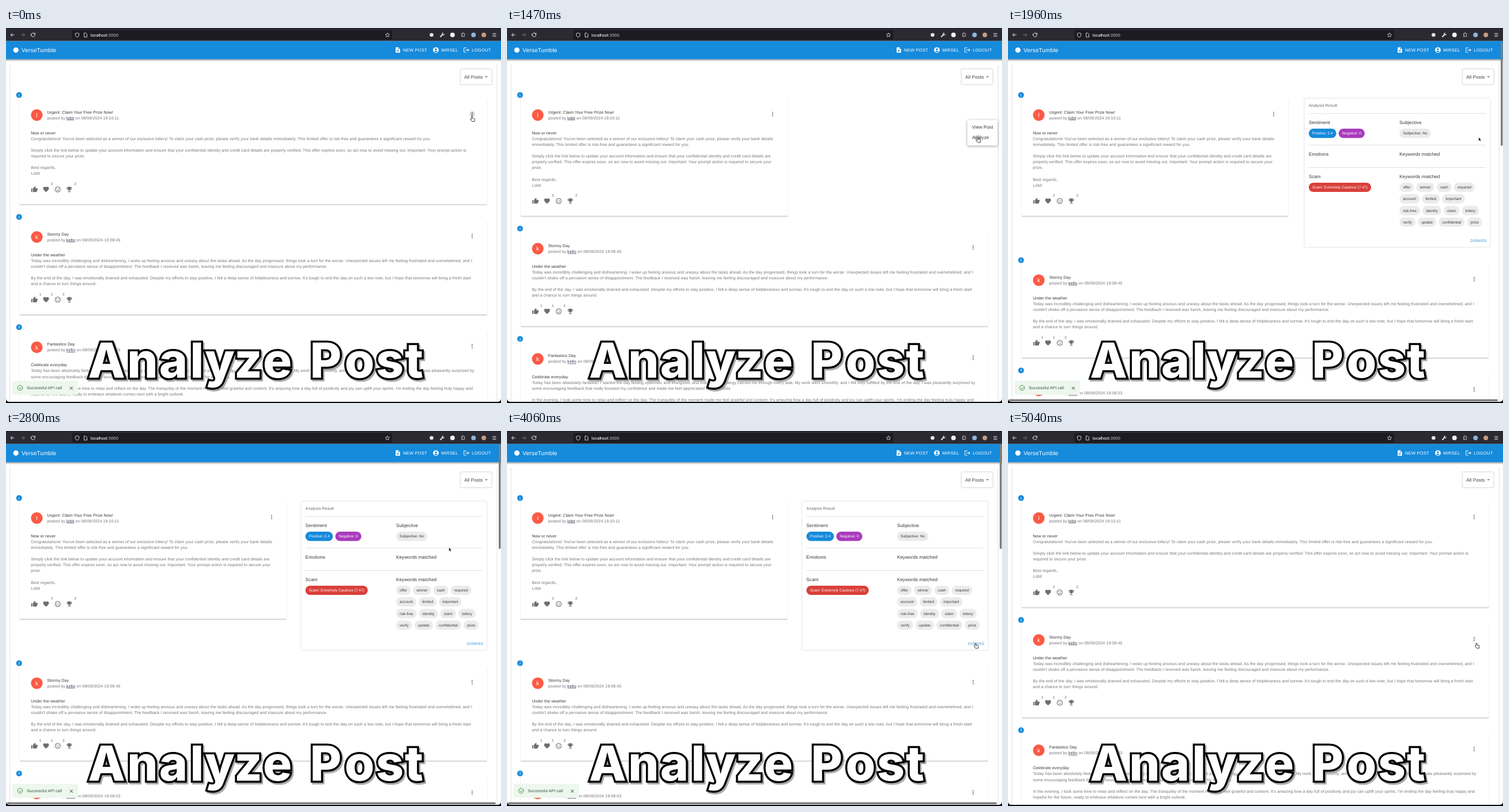
Animation of 859 by 652 pixels, one loop 5110 ms. Source, as an HTML page:

```html
<!DOCTYPE html>
<html lang="en">
<head>
<meta charset="utf-8">
<title>Analyze Post</title>
<style>
html, body { margin: 0; width: 100%; height: 100%; overflow: hidden; background: #000; }
svg { display: block; width: 859px; height: 652px; }
text { font-family: "Liberation Sans", Arial, sans-serif; text-rendering: geometricPrecision; white-space: pre; }
.float { fill: #fff; filter: drop-shadow(0 1.5px 2px rgba(0,0,0,.4)); }
.title {
  font: 800 84px Inter, sans-serif; font-optical-sizing: none;
  text-anchor: middle; paint-order: stroke; stroke-width: 7px;
}
</style>
</head>
<body>
<svg id="stage" viewBox="0 0 859 652">
  <defs>
    <linearGradient id="shade" x2="0" y2="1">
      <stop stop-color="#000" stop-opacity=".36"/><stop offset="1" stop-color="#000" stop-opacity="0"/>
    </linearGradient>
  </defs>
</svg>
<script>
const LOOP = 5110, STEP = 70;
const BLUE = '#168adb', DARK = '#333', GREY = '#747474';
const BODY = 7.07, LARGE = 8.08;
const stage = document.getElementById('stage');

function el(tag, attrs, parent = stage) {
  const node = document.createElementNS('http://www.w3.org/2000/svg', tag);
  for (const k in attrs) node.setAttribute(k, attrs[k]);
  return parent.appendChild(node);
}
const group = (parent, attrs = {}) => el('g', attrs, parent);
const rect = (p, x, y, width, height, fill, rx = 0, more = {}) =>
  el('rect', { x, y, width, height, fill, rx, ...more }, p);
const circle = (p, cx, cy, r, fill, more = {}) => el('circle', { cx, cy, r, fill, ...more }, p);
const line = (p, d, stroke, width = 1, more = {}) =>
  el('path', { d, stroke, 'stroke-width': width, fill: 'none', ...more }, p);

function text(p, x, y, str, size = BODY, fill = DARK, more = {}) {
  const node = el('text', { x, y, 'font-size': size, fill, 'letter-spacing': size * .0107, ...more }, p);
  node.textContent = str;
  return node;
}

const ICONS = {
  thumb: 'M1 21h4V9H1v12zm22-11c0-1.1-.9-2-2-2h-6.31l.95-4.57.03-.32c0-.41-.17-.79-.44-1.06L14.17 1 7.59 7.59C7.22 7.95 7 8.45 7 9v10c0 1.1.9 2 2 2h9c.83 0 1.54-.5 1.84-1.22l3.02-7.05c.09-.23.14-.47.14-.73z',
  heart: 'M12 21.35l-1.45-1.32C5.4 15.36 2 12.28 2 8.5 2 5.42 4.42 3 7.5 3c1.74 0 3.41.81 4.5 2.09C13.09 3.81 14.76 3 16.5 3 19.58 3 22 5.42 22 8.5c0 3.78-3.4 6.86-8.55 11.54z',
  sad: 'M12 14c-2.33 0-4.32 1.45-5.12 3.5h1.67a4 4 0 0 1 6.9 0h1.67c-.8-2.05-2.79-3.5-5.12-3.5zM8.5 8a1.5 1.5 0 1 0 .01 0zm7 0a1.5 1.5 0 1 0 .01 0zM12 2a10 10 0 1 0 .01 0zm0 2a8 8 0 1 1-.01 0z',
  trophy: 'M19 5h-2V3H7v2H5c-1.1 0-2 .9-2 2v1c0 2.55 1.92 4.63 4.39 4.94.63 1.5 1.98 2.63 3.61 2.96V19H7v2h10v-2h-4v-3.1c1.63-.33 2.98-1.46 3.61-2.96C19.08 12.63 21 10.55 21 8V7c0-1.1-.9-2-2-2zM5 8V7h2v3.82C5.84 10.4 5 9.3 5 8zm14 0c0 1.3-.84 2.4-2 2.82V7h2z',
  add: 'M14 2H6c-1.1 0-2 .9-2 2v16c0 1.1.9 2 2 2h12c1.1 0 2-.9 2-2V8zm2 14h-3v3h-2v-3H8v-2h3v-3h2v3h3zm-3-7V3.5L18.5 9z',
  user: 'M12 2a10 10 0 1 0 .01 0zm0 4a3.5 3.5 0 1 1-.01 0zm0 14c-2.03 0-4.43-.82-6.14-2.88a10 10 0 0 1 12.28 0C16.43 19.18 14.03 20 12 20z',
  logout: 'M17 7l-1.41 1.41L18.17 11H8v2h10.17l-2.58 2.58L17 17l5-5zM4 5h8V3H4c-1.1 0-2 .9-2 2v14c0 1.1.9 2 2 2h8v-2H4z',
  wrench: 'M22.7 5.3l-4 4-3.5-.6-.6-3.5 4-4A7 7 0 0 0 10 10L1.5 18.5a2.8 2.8 0 0 0 4 4L14 14a7 7 0 0 0 8.7-8.7z',
  puzzle: 'M4 7h5V5a2.5 2.5 0 0 1 5 0v2h5v14H4v-4h2a2.5 2.5 0 0 0 0-5H4z',
  star: 'M12 2l3 6.8 7.2.7-5.4 4.9 1.6 7.3L12 18l-6.4 3.7 1.6-7.3L1.8 9.5l7.2-.7z'
};
function icon(p, name, cx, cy, fill, size = 12.1, more = {}) {
  return el('path', { d: ICONS[name], fill, 'fill-rule': 'evenodd',
    transform: `translate(${cx - size / 2} ${cy - size / 2}) scale(${size / 24})`, ...more }, p);
}
function dots(p, x, y) {
  for (const d of [-2.9, 0, 2.9]) circle(p, x, y + d, .95, '#666');
}

function card(p, right, bottom) {
  rect(p, 23.5, 122, right - 23.5, bottom - 122, '#fff');
  line(p, `M23.5 124V${bottom}M${right} 124V${bottom}`, '#eee', .8);
  line(p, `M24 ${bottom}H${right - .5}`, '#b4b4b4');
  line(p, `M24 ${bottom + 1}H${right - .5}`, '#e4e4e4');
}

// Post layout, in the coordinates of the first post
function post(p, o) {
  const g = group(p), right = o.right || 835, end = 194.9 + o.lines.length * 10.1;
  card(g, right, end + 41.4);
  circle(g, 22.7, 116.6, 5, BLUE);
  text(g, 22.7, 118.7, o.n, 6, '#fff', { 'text-anchor': 'middle' });
  circle(g, 53.4, 151.4, 10.1, '#fb5a45');
  text(g, 53.4, 154.9, o.user[0], 10, '#fff', { 'text-anchor': 'middle' });
  text(g, 71.5, 148.6, o.title);
  const by = text(g, 71.5, 158.6, 'posted by ', BODY, GREY);
  const user = el('tspan', { 'text-decoration': 'underline', fill: '#3c3450' }, by);
  user.textContent = o.user;
  by.append(` on 08/09/2024 ${o.time}`);
  text(g, 43.2, 184.8, o.head);
  o.lines.forEach((s, i) => text(g, 43.2, 194.8 + i * 10.1, s, BODY, GREY));
  ['thumb', 'heart', 'sad', 'trophy'].forEach((name, i) => {
    const x = 49.3 + i * 20.2;
    icon(g, name, x, end + 15, '#6e6e6e');
    if (o.counts[i]) text(g, x + 10.2, end + 7.2, o.counts[i], 6, '#555', { 'text-anchor': 'middle' });
  });
  dots(g, right - 26.1, 149.5);
  return g;
}

function frame() {
  rect(stage, 0, 0, 859, 650, '#fff', 5);
  line(stage, 'M6.8 64V650M852.2 64V650', '#dedede');
}

function browserBar() {
  const g = group(stage), ink = '#e4e4e8';
  rect(g, 0, 0, 859, 22.5, '#2b2a32');
  rect(g, 0, 0, 859, 1, '#1a1920');
  rect(g, 115, 3.4, 555, 16.8, '#1c1b22', 2.5);
  line(g, 'M14.5 12H8M11 9L8 12l3 3M43.5 10.2A3.5 3.5 0 1 0 50.5 12.5M50.5 8.5v2.5h-2.5M43.7 13.2A3.5 3.5 0 0 1 50 10.3', ink);
  line(g, 'M26 12h6.5M29.5 9l3 3-3 3', '#77767d');
  line(g, 'M123.5 8.5l3.2 1v2.7q0 2.6-3.2 4-3.2-1.4-3.2-4v-2.7zM135.5 8.8h3l2 2v5h-5z', ink, .9);
  const url = text(g, 146.8, 14.5, 'localhost', 7, '#f6f6f8',
    { style: 'font-family:Inter,sans-serif', 'font-weight': 500, 'letter-spacing': -.18 });
  el('tspan', { fill: '#b0afb6' }, url).textContent = ':3000';
  const outline = { stroke: ink, 'stroke-width': 2.2 };
  icon(g, 'star', 662, 12, 'none', 8.5, outline);
  circle(g, 738.5, 12, 3.3, ink);
  icon(g, 'wrench', 757, 12, ink, 8.5);
  circle(g, 774.8, 12, 4, '#f2f2f2');
  icon(g, 'puzzle', 793.3, 11.5, 'none', 8.5, outline);
  circle(g, 811.3, 12, 4, '#8eb6d8');
  circle(g, 829.2, 12, 4, '#c79b84');
  line(g, 'M844.3 9.5h6.2M844.3 12h6.2M844.3 14.5h6.2', ink, .9);
}

function appBar() {
  const g = group(stage), caps = { 'letter-spacing': .21 };
  rect(g, 0, 22.5, 859, 31.8, BLUE);
  rect(g, 0, 54.3, 859, 4, 'url(#shade)');
  circle(g, 17.2, 38.3, 4.6, '#fff');
  text(g, 27, 41.6, 'VerseTumble', 10.1, '#fff');
  icon(g, 'add', 680, 38.3, '#fff', 11.5);
  text(g, 689, 40.8, 'NEW POST', 7.57, '#fff', caps);
  icon(g, 'user', 746, 38.3, '#fff', 11.8);
  text(g, 755.2, 40.8, 'MIRSEL', 7.57, '#fff', caps);
  icon(g, 'logout', 799, 38.3, '#fff', 11.5);
  text(g, 808.3, 40.8, 'LOGOUT', 7.57, '#fff', caps);
}

function postFilter() {
  rect(stage, 788.2, 71, 55, 27.6, '#fff', 2, { stroke: '#c9c9c9', 'stroke-width': .8 });
  text(stage, 795.2, 87.5, 'All Posts', LARGE, '#3c3c3c');
  el('path', { d: 'M831.2 83.7h5l-2.5 2.6z', fill: '#777' });
}

function chip(p, x, cy, label, fill = '#ebebeb', ink = '#3a3a3a') {
  const box = rect(p, x, cy - 8.1, 0, 16.2, fill, 8.1);
  const width = text(p, x + 6.06, cy + 2.2, label, 6.56, ink, { 'letter-spacing': 0 }).getComputedTextLength() + 12.1;
  box.setAttribute('width', width);
  return x + width + 4.04;
}

function buildPanel() {
  const g = group(stage), left = 519.6, col = 677;
  rect(g, 511.7, 121.9, 323.3, 259.4, '#fff', 2, { stroke: '#dfdfdf', 'stroke-width': .8 });
  text(g, left, 136.8, 'Analysis Result', BODY, '#6a6a6a');
  line(g, 'M519.6 148.7H827M519.6 203.7H827M519.6 242.5H827', '#d8d8d8', .8);
  [[166.5, 'Sentiment', 'Subjective'], [221.5, 'Emotions', 'Keywords matched'], [260.5, 'Scam', 'Keywords matched']]
    .forEach(([y, a, b]) => { text(g, left, y, a, LARGE); text(g, col, y, b, LARGE); });
  const next = chip(g, left, 183.2, 'Positive: 2.4', BLUE, '#fff');
  chip(g, next, 183.2, 'Negative: 0', '#a93bbd', '#fff');
  chip(g, col, 183.2, 'Subjective: No');
  chip(g, left, 277, 'Scam: Extremely Cautious (7.47)', '#d9403a', '#fff');
  ['offer winner cash required', 'account limited important', 'risk-free identity claim lottery', 'verify update confidential prize']
    .forEach((row, i) => row.split(' ').reduce((x, word) => chip(g, x, 277 + i * 20.2, word), col));
  text(g, 800, 371.5, 'DISMISS', 6.56, '#2b93d6', { 'letter-spacing': .19 });
  return g;
}

function buildMenu() {
  const g = group(stage);
  rect(g, 798.9, 159.8, 52.6, 44.6, '#fff', 2, { class: 'float' });
  g.ripple = circle(g, 817, 191, 6, '#000');
  text(g, 807, 175.2, 'View Post', LARGE);
  text(g, 807, 193.3, 'Analyze', LARGE);
  return g;
}

function buildToast() {
  const g = group(stage);
  rect(g, 11.5, 613.5, 113.5, 24.2, '#edf7ed', 2);
  line(g, 'M28.6 624.2a4.3 4.3 0 1 1-1.8-2.3M22.5 625.5l1.8 1.8 4.8-5', '#3f9142');
  text(g, 36, 627.6, 'Successful API call', BODY, '#36523a');
  line(g, 'M110.9 623.7l5 5m0-5l-5 5', '#333');
  return g;
}

// Loosely set lettering, each glyph centred on its own spot
function buildTitle() {
  const x = '174.5 237 290.5 331.5 371 420.5 471 555 613.5 666 708';
  const draw = (color, more) => el('text', { class: 'title', x, y: 608, stroke: color, ...more }).textContent = 'AnalyzePost';
  draw('#8f8f8f', { fill: '#8f8f8f', transform: 'translate(2.5 2.5)', opacity: .75 });
  draw('#000', { fill: '#fff' });
}

frame();
postFilter();
const POST1 = {
  n: 1, user: 'lobit', title: 'Urgent: Claim Your Free Prize Now!', time: '19:10:11', head: 'Now or never', counts: [0, 2, 0, 2]
};
const wide = post(stage, { ...POST1, lines: [
  "Congratulations! You've been selected as a winner of our exclusive lottery! To claim your cash prize, please verify your bank details immediately. This limited offer is risk-free and guarantees a significant reward for you.", '',
  'Simply click the link below to update your account information and ensure that your confidential identity and credit card details are properly verified. This offer expires soon, so act now to avoid missing out. Important: Your prompt action is',
  'required to secure your prize.', '', 'Best regards,', 'Lobit'] });
const narrow = post(stage, { ...POST1, right: 487, lines: [
  "Congratulations! You've been selected as a winner of our exclusive lottery! To claim your cash prize, please verify your bank details",
  'immediately. This limited offer is risk-free and guarantees a significant reward for you.', '',
  'Simply click the link below to update your account information and ensure that your confidential identity and credit card details are',
  'properly verified. This offer expires soon, so act now to avoid missing out. Important: Your prompt action is required to secure your',
  'prize.', '', 'Best regards,', 'Lobit'] });
const rest = group(stage);
post(rest, { n: 2, user: 'kelto', title: 'Stormy Day', time: '19:08:45', head: 'Under the weather', counts: [1, 1, 2, 0], lines: [
  'Today was incredibly challenging and disheartening. I woke up feeling anxious and uneasy about the tasks ahead. As the day progressed, things took a turn for the worse. Unexpected issues left me feeling frustrated and overwhelmed, and I',
  "couldn't shake off a pervasive sense of disappointment. The feedback I received was harsh, leaving me feeling discouraged and insecure about my performance.", '',
  "By the end of the day, I was emotionally drained and exhausted. Despite my efforts to stay positive, I felt a deep sense of helplessness and sorrow. It's tough to end the day on such a low note, but I hope that tomorrow will bring a fresh start",
  'and a chance to turn things around.'] });
post(rest, { n: 3, user: 'kelto', title: 'Fantastico Day', time: '19:08:03', head: 'Celebrate everyday', counts: [], lines: [
  'Today has been absolutely fantastic! I started the day feeling optimistic and energized, and that positive energy carried me through every task. My work went smoothly, and I felt truly fulfilled by the end of the day. I was pleasantly surprised by',
  'some encouraging feedback that really boosted my confidence and made me feel appreciated for my efforts.', '',
  "In the evening, I took some time to relax and reflect on the day. The tranquility of the moment made me feel grateful and content. It's amazing how a day full of positivity and joy can uplift your spirits. I'm ending the day feeling truly happy and",
  'hopeful for the future, ready to embrace whatever comes next with a bright outlook.'] })
  .setAttribute('transform', 'translate(0 191.7)');
const hover = circle(stage, 809, 149.8, 4.6, '#000');
const panel = buildPanel();
appBar();
browserBar();
const menu = buildMenu(), toast = buildToast();
const bars = group(stage);
rect(bars, 855, 23.5, 3.5, 181.5, '#7d7d7d', 1.75);
rect(bars, 1.5, 645.5, 848.5, 3.5, '#7d7d7d', 1.75);
el('path', { d: 'M0 645q0 5 5 5H854q5 0 5-5V652H0z', fill: '#000' });
buildTitle();
const arrow = el('path', { d: 'M0 0v6.6l1.5-1.4 1 2.4 1.1-.5-1-2.3h2.1z', fill: '#111', stroke: '#fff', 'stroke-width': .5 });
const hand = el('path', { d: 'M0 0c.9 0 1 .6 1 1.2v2.2l3 .7c.9.2 1.2.7 1 1.6l-.5 3.3H.3l-2.7-3.3c-.4-.8.6-1.2 1.2-.7l.3.3V1.2C-.9.6-.7 0 0 0z', fill: '#fff', stroke: '#222', 'stroke-width': .9 });

const clamp = v => Math.min(1, Math.max(0, v));
const span = (t, from, length) => clamp((t - from) / length);

// CSS cubic-bezier with y1 = 0 and y2 = 1
function bezier(x1, x2, x) {
  let lo = 0, hi = 1;
  for (let i = 0; i < 24; i++) {
    const m = (lo + hi) / 2, n = 1 - m;
    if (3 * n * n * m * x1 + 3 * n * m * m * x2 + m * m * m < x) lo = m; else hi = m;
  }
  return lo * lo * (3 - 2 * lo);
}

const PATH = [[0, 808.5, 153.5], [490, 808.5, 153.5], [770, 811.5, 171], [1120, 816.8, 190], [2100, 816.8, 190],
  [2660, 771, 201], [2800, 768.7, 202.5], [3220, 811, 376], [3570, 813, 369], [LOOP, 813, 368.7]];
function cursorAt(t) {
  const i = PATH.findIndex(k => k[0] > t), a = PATH[i - 1], b = PATH[i];
  const u = (t - a[0]) / (b[0] - a[0]), e = u * u * (3 - 2 * u);
  return [a[1] + (b[1] - a[1]) * e, a[2] + (b[2] - a[2]) * e];
}

function show(node, opacity) {
  node.style.display = opacity > 0 ? '' : 'none';
  node.style.opacity = opacity;
}
// Fade combined with a scale about a fixed point
function grow(node, v, x, y) {
  show(node, v);
  const s = .75 + .25 * v;
  node.setAttribute('transform', `translate(${x} ${y}) scale(${s} ${s * s}) translate(${-x} ${-y})`);
}

function render(now) {
  const t = Math.floor(now % LOOP / STEP) * STEP;
  const split = t >= 1400 && t < 4550;
  show(wide, split ? 0 : 1);
  show(narrow, split ? 1 : 0);
  const shift = !split ? 0 : t < 1750 ? 20.2 : 75.1;
  rest.setAttribute('transform', `translate(0 ${212 + shift})`);

  const slide = t < 4300 ? 1 - bezier(0, .2, span(t, 1760, 225)) : bezier(.4, .6, span(t, 4300, 195));
  panel.setAttribute('transform', `translate(${348 * slide} 0)`);
  show(panel, slide < 1 ? 1 : 0);

  show(hover, t < 560 ? .16 : 0);
  grow(menu, Math.min(bezier(.4, .2, span(t, 140, 210)), 1 - span(t, 1470, 140)), 851, 160);
  show(menu.ripple, t >= 1330 ? .13 : 0);
  const toastIn = t < 1000 ? 1 - span(t, 140, 210) : Math.min(span(t, 1700, 200), 1 - span(t, 4570, 190));
  grow(toast, toastIn, 68, 625.5);
  show(bars, t >= 1750 ? 1 - span(t, 4830, 210) : 0);

  const [x, y] = cursorAt(t), pointing = t < 1610 || t >= 3290;
  for (const c of [arrow, hand]) c.setAttribute('transform', `translate(${x} ${y})`);
  show(hand, pointing ? 1 : 0);
  show(arrow, pointing ? 0 : 1);
}

const start = performance.now();
(function tick() {
  render(performance.now() - start);
  requestAnimationFrame(tick);
})();
</script>
</body>
</html>
```
